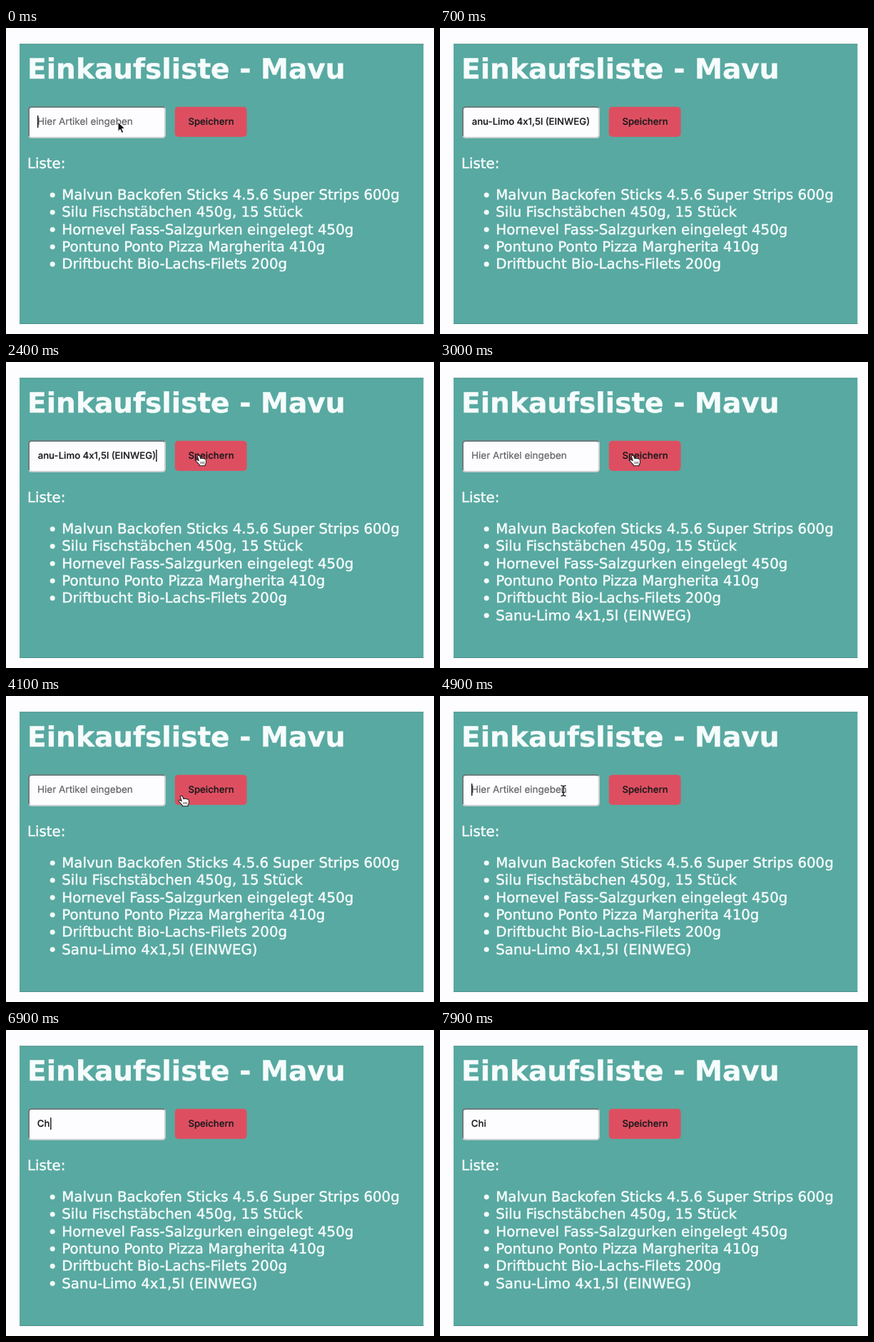
Recreate the animation shown at these times as an HTML page. Size 600 px wide and 430 px high, loop 8000 ms.

```html
<!DOCTYPE html>
<html lang="de">
<head>
<meta charset="utf-8">
<title>Einkaufsliste</title>
<style>
  html, body { margin: 0; width: 100%; height: 100%; overflow: hidden; background: #fdfcfe; }
  svg { display: block; text-rendering: geometricPrecision; filter: blur(.35px); }
  .page { font: 19.75px "DejaVu Sans", Verdana, sans-serif; fill: #f6fcfc; stroke: #f6fcfc; stroke-width: .45; }
  .title { font-size: 39.1px; font-weight: bold; }
  .form { font: 500 13.2px Inter, Roboto, sans-serif; fill: #1c1a1d; stroke: #1c1a1d; stroke-width: .2; }
  .hint { font-weight: 400; font-size: 13.5px; fill: #626265; stroke: #626265; }
</style>
</head>
<body>
<svg width="600" height="430" viewBox="0 0 600 430">
  <defs><clipPath id="inner"><rect x="44" y="114" width="169" height="36"/></clipPath></defs>
  <rect x="19" y="22.5" width="566.3" height="393.5" fill="#58a9a1"/>
  <path d="M19 22.8H585.3M19 415.5H585.3" stroke="#4b8f8a"/>

  <g class="page">
    <text class="title" x="30" y="71">Einkaufsliste - Mavu</text>
    <text x="30" y="197.3">Liste:</text>
    <g id="list"></g>
  </g>

  <rect x="32" y="111" width="191" height="43" rx="4" fill="#fdfcfe"/>
  <g fill="none" stroke-width="2">
    <path d="M222 112Q223 113 223 115V150Q223 154 219 154H36Q33 154 32.5 152" stroke="#c9d0d1"/>
    <path d="M32 152V115Q32 111 36 111H219Q221 111 222 112" stroke="#6c7d7d"/>
  </g>
  <rect x="236.7" y="110.7" width="100.9" height="42.3" rx="5" fill="#dd4f60"/>

  <g class="form">
    <text x="255.4" y="136.2">Speichern</text>
    <text id="hint" class="hint" x="44" y="136.2">Hier Artikel eingeben</text>
    <g clip-path="url(#inner)"><text id="entry" y="136.2"></text></g>
    <rect id="caret" y="123.5" width="1.3" height="16.5"/>
  </g>

  <g id="arrow">
    <path d="M0 0V13.4L3.1 10.5L5.3 15.6L7.7 14.6L5.5 9.6H9.8Z" fill="#111" stroke="#fff" stroke-width="1"/>
  </g>
  <g id="hand">
    <path d="M-1.8 1.2Q0 -.8 1.6 1.2L2.7 4.6Q4.1 3.6 5.4 4.6Q6.8 3.8 8 5.1Q9.9 4.7 10.4 6.6L10.5 10Q10.3 12 9.2 13V14.7H1.2V13.4L-3.8 8.2Q-4.4 6.2 -2.3 6.3L.2 7.7Z"
      fill="#fff" stroke="#222" stroke-width="1.1" stroke-linejoin="round"/>
    <path d="M3.2 9V12.2M5.3 9V12.2M7.4 9V12.2" stroke="#222" stroke-width=".8"/>
  </g>
  <g id="beam" fill="none">
    <path d="M-3.5 -7Q0 -7 0 -5V5.5Q0 7.5 -3.5 7.5M3.5 -7Q0 -7 0 -5V5.5Q0 7.5 3.5 7.5M-2 2.5H2" stroke="#222" stroke-width="1.4"/>
  </g>
</svg>
<script>
const LOOP = 8000, BLINK = 1060;
const PASTE = 150, BLUR = 2700, SAVE = 2800, FOCUS = 4850;
const KEYS = [6500, 6760, 6960], TYPED = 'Chi';
const NEW_ITEM = 'Sanu-Limo 4x1,5l (EINWEG)';
const ITEMS = [
  'Malvun Backofen Sticks 4.5.6 Super Strips 600g',
  'Silu Fischstäbchen 450g, 15 Stück',
  'Hornevel Fass-Salzgurken eingelegt 450g',
  'Pontuno Ponto Pizza Margherita 410g',
  'Driftbucht Bio-Lachs-Filets 200g',
  NEW_ITEM
];
// Pointer stops: time, x, y
const PATH = [
  [0, 157, 132], [1000, 157, 132], [1700, 205, 131], [2200, 270, 131], [3700, 270, 131],
  [4100, 246, 140], [4700, 173, 133], [LOOP, 173, 133]
];

const el = id => document.getElementById(id);
const show = (id, on) => el(id).setAttribute('visibility', on ? 'visible' : 'hidden');

el('list').innerHTML = ITEMS.map((item, i) => {
  const y = 241 + 24.3 * i;
  return `<g id="item${i}"><circle cx="65.2" cy="${y - 6.3}" r="3.3"/><text x="78.3" y="${y}">${item}</text></g>`;
}).join('');

function pointerAt(t) {
  const i = PATH.findIndex(p => p[0] > t);
  const [t0, x0, y0] = PATH[i - 1], [t1, x1, y1] = PATH[i];
  const k = (t - t0) / (t1 - t0), e = k * k * (3 - 2 * k);
  return [x0 + (x1 - x0) * e, y0 + (y1 - y0) * e];
}

function drawField(t) {
  const pasted = t >= PASTE && t < SAVE;
  const text = pasted ? NEW_ITEM : TYPED.slice(0, KEYS.filter(k => t >= k).length);
  const entry = el('entry');
  entry.textContent = text;
  entry.setAttribute('text-anchor', pasted ? 'end' : 'start');
  entry.setAttribute('x', pasted ? 210 : 43.8);
  show('hint', !text);

  // The caret restarts its blink at every click or key.
  const start = [0, PASTE, FOCUS, ...KEYS].filter(s => s <= t).pop();
  const focused = t < BLUR || t >= FOCUS;
  el('caret').setAttribute('x', pasted ? 210.2 : text ? 44.5 + entry.getComputedTextLength() : 44);
  show('caret', focused && (t - start) % BLINK < BLINK / 2);
}

function drawPointer(t) {
  const [x, y] = pointerAt(t);
  const hidden = (t >= PASTE && t < 1000) || t >= KEYS[0];
  const shape = x > 236 ? 'hand' : t < SAVE ? 'arrow' : 'beam';
  for (const id of ['arrow', 'hand', 'beam']) {
    el(id).setAttribute('transform', `translate(${x} ${y})`);
    show(id, !hidden && id === shape);
  }
}

function frame(now) {
  const t = now % LOOP;
  show('item5', t >= SAVE);
  drawField(t);
  drawPointer(t);
  requestAnimationFrame(frame);
}
requestAnimationFrame(frame);
</script>
</body>
</html>
```
